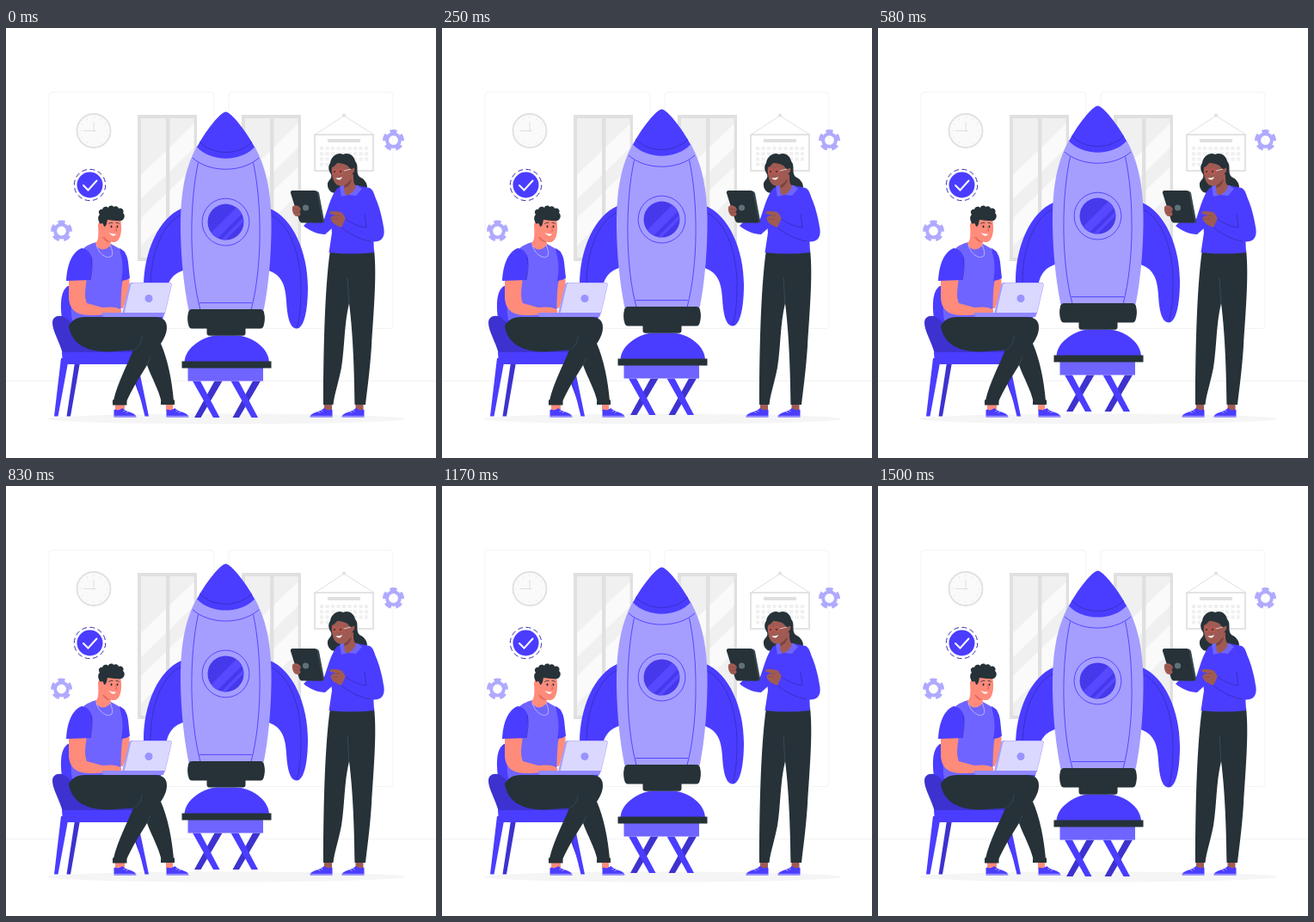
An HTML page for the animation above (1540 ms loop, 500x500 px).

```html
<!DOCTYPE html>
<html lang="en">
<head>
<meta charset="utf-8">
<title>Rocket workshop</title>
<style>
  html, body { margin: 0; width: 100%; height: 100%; overflow: hidden; background: #fff; }
  svg { display: block; width: 100%; height: 100%; }
  .main { fill: #4a3dff; }
  .deep { fill: #3d32cf; }
  .mid { fill: #6f64ff; }
  .pale { fill: #a59eff; }
  .dark { fill: #263238; }
  .skin { fill: #ff8b7b; }
  .brown { fill: #9f5b53; }
  .white { fill: #fff; }
  .line { fill: none; stroke: #4a3dff; stroke-width: .9; }
  .seam { fill: none; stroke: #2f26a8; stroke-width: .6; }
  .ink { fill: none; stroke: #263238; stroke-width: .8; stroke-linecap: round; }
  .grey { fill: none; stroke: #e0e0e0; }
</style>
</head>
<body>
<svg viewBox="0 0 500 500">
  <defs>
    <clipPath id="glass"><path d="M4 4H33V166H4ZM37.500 4H65.500V166H37.500Z"/></clipPath>
    <clipPath id="port"><circle cx="255.500" cy="226" r="21"/></clipPath>
    <g id="window">
      <path fill="#e0e0e0" d="M0 0H69V170H0Z"/>
      <g clip-path="url(#glass)">
        <path fill="#f0f0f0" d="M0 0H69V170H0Z"/>
        <path fill="#fafafa" d="M4 70L66 10V38L4 98ZM4 120L66 60V92L4 152Z"/>
      </g>
    </g>
    <g id="gear" fill="none" stroke="#b0aaff">
      <circle r="7.400" stroke-width="4"/>
      <circle r="10.400" stroke-width="4" pathLength="50" stroke-dasharray="6 4" transform="rotate(-111.600)"/>
    </g>
    <g id="fin">
      <path class="main" d="M306 210C334 221 351 262 351 302C351 331 346 350 338 350C330 350 327 336 326 318C325 299 320 286 303 282Z"/>
      <path class="seam" d="M308 218C330 229 343 264 343 302C343 325 341 340 338 349"/>
    </g>
    <g id="trestle">
      <path class="deep" d="M242.500 411H251.500L226.500 453.500H219Z"/>
      <path class="main" d="M217 411H226L248.500 453.500H241Z"/>
    </g>
    <g id="shoe">
      <path class="main" d="M0 0C3 -1 4 1 6 0L10 -2C14 3 26 3 26 8.500H0Z"/>
      <path d="M0 7.300H26M11 2l3-1.500M14 3.500l3-1.500" fill="none" stroke="#fff" stroke-width=".5"/>
    </g>
  </defs>

  <!-- room -->
  <g fill="none" stroke="#f3f3f3">
    <rect x="50" y="74.500" width="192" height="275" rx="4"/>
    <rect x="259" y="74.500" width="191" height="275" rx="4"/>
    <path d="M0 410.500H500"/>
  </g>
  <ellipse cx="256" cy="454.500" rx="208" ry="6" fill="#f5f5f5"/>
  <use href="#window" x="153" y="101"/>
  <use href="#window" x="274" y="101"/>

  <g class="grey">
    <circle cx="102" cy="119.500" r="19.500" stroke-width="1.800" fill="#fafafa"/>
    <circle cx="102" cy="119.500" r="15.500" stroke-width="2" pathLength="120" stroke-dasharray=".8 9.200" stroke-dashoffset=".4"/>
    <path d="M102 109V121M90 119.500H105"/>
    <path d="M360 123.500L393 102L427 123.500"/>
    <rect x="359" y="124" width="68" height="42" stroke-width="1.800" fill="#fff"/>
    <path d="M374 131H412" stroke-width="4"/>
    <path d="M365 140H422M365 146.200H422M365 152.400H422M365 158.600H409" stroke="#f0f0f0" stroke-width="4" stroke-dasharray="4.200 2.300"/>
    <circle cx="393" cy="101.500" r="2" fill="#e0e0e0" stroke="none"/>
  </g>

  <use href="#gear" x="64.500" y="236"/>
  <use href="#gear" x="450.500" y="130.500"/>
  <circle class="main" cx="97.500" cy="182.500" r="15"/>
  <circle cx="97.500" cy="182.500" r="18.200" fill="none" stroke="#3a30a8" pathLength="96" stroke-dasharray="5 3"/>
  <path d="M90 183L95.500 188.500L105.500 177.500" fill="none" stroke="#fff" stroke-width="2" stroke-linecap="round"/>

  <!-- chair -->
  <path class="deep" d="M80 389H86L75 451.500H70.500ZM141 389H147L160 430L158 435Z"/>
  <path class="main" d="M64 384H73L60.500 451.500H56ZM146 389H153L166 451.500H161.500Z"/>
  <path class="main" d="M72 300C63 306 63 322 65 338L72 356H90V300Z"/>
  <path class="deep" d="M54 343C54 336 60 333 68 336L80 346L150 372V379H66C62 364 54 352 54 343Z"/>
  <path class="main" d="M65 377H150V391H66Z"/>

  <!-- rocket -->
  <g id="rocket">
    <use href="#trestle"/>
    <use href="#trestle" x="44.500"/>
    <path class="mid" d="M211.500 395H299V411H211.500Z"/>
    <path class="main" d="M207.500 389C208 371 232 358 246 358H266C284 358 305 371 306 389Z"/>
    <path class="dark" d="M204.500 388H308.500V396H204.500Z"/>
    <rect class="dark" x="233.500" y="347" width="45" height="11.200" rx="3"/>
    <use href="#fin"/>
    <use href="#fin" transform="matrix(-1 0 0 1 511 0)"/>
    <path class="pale" d="M222 138C206 167 202.500 200 203 237C203.500 270 207 302 212.500 329H299.500C305 302 308 270 308.500 237C309 200 305 167 289 138Z"/>
    <path class="main" d="M255.500 98C261.500 98 279 120 289 139C273 156.500 238 156.500 222 139C232 120 249.500 98 255.500 98Z"/>
    <path class="seam" d="M225 132.500C240 149 271 149 286 132.500"/>
    <path class="line" d="M217 151.500C237 169 274 169 294 151.500M223.500 157C213 205 213 280 226 328M287.500 157C298 205 298 280 285 328M225 320H286"/>
    <circle class="line" cx="255.500" cy="226" r="27.400"/>
    <circle cx="255.500" cy="226" r="21" fill="#4639ec"/>
    <path d="M233 244L274 203H288L233 258ZM241 256L280 217V222L246 256Z" fill="#5649ff" clip-path="url(#port)"/>
    <path class="dark" d="M216 327.500H296Q299 327.500 300 331Q302 339 299.500 347Q298.500 350 296 350H216Q213.500 350 212.500 347Q210 339 212 331Q213 327.500 216 327.500Z"/>
  </g>

  <!-- seated man -->
  <path class="skin" d="M127 436H138V445H127ZM186 436H194V445H186Z"/>
  <use href="#shoe" x="125.500" y="444"/>
  <use href="#shoe" x="186.500" y="444"/>
  <path class="skin" d="M133 292H143.500C144 304 140 316 136 326H126Z"/>
  <path class="mid" d="M97 252C104 248 114 248 122 251L138 260C141 270 139 285 135 297C133 315 134 325 133 340H77C74 325 77 305 79 290C80 270 86 256 97 252Z"/>
  <path class="main" d="M132 256C138 259 141 264 142 272L144 291Q139 294 134 294C136 285 136 274 134 266Z"/>
  <path class="dark" d="M73 346C75 363 88 376 118 376.500L148 374.500C140 394 130 412 125 433L139 437C146 420 156 405 164 392C169 406 178 421 181 436L195 434C193 410 188 385 180 367C186 358 188 351 186.500 344C185 338 179 335.500 170 336L92 336C82 336 77 340 73 346Z"/>
  <path d="M124 432.500L140.500 433.500V438.500H124ZM180 433.500L196 432.500V438H180Z" class="dark"/>
  <path d="M150 374C156 369 158 363 158 358M164 392L168 383" fill="none" stroke="#455a64" stroke-width=".5"/>
  <path class="skin" d="M107 228C108 243 107 248 104 250C106 258 115 261 122 252L121 242Z"/>
  <path d="M112 243C115 248 118 249 121.500 249L120 244Z" fill="#e0695d"/>
  <path class="skin" d="M112 222C118 217 129 217 133 222C135 231 135 248 126 249C118 250 112 242 111 235C106 234 106 225 110 225Z"/>
  <path class="dark" d="M110 228C107 225 106 219 109 217C106 213 110 210 112 211C113 207 117 207 119 209C120 206 124 206 125 208C128 206 131 208 131 210C135 208 138 213 136 215C139 217 138 223 134 224C129 225 122 223 118 223C117 227 117 231 114 231C113 227 112 226 110 228Z"/>
  <ellipse class="dark" cx="122.500" cy="231" rx="1" ry="1.400"/>
  <ellipse class="dark" cx="129.500" cy="231" rx=".9" ry="1.400"/>
  <path class="ink" d="M119.500 227.500Q122 225.500 124 226.500M128 226.500Q130 226 131.500 227.500"/>
  <path d="M127 231L129 236L126 236" fill="none" stroke="#d85d55" stroke-width=".7"/>
  <path class="white" d="M119.500 238Q124 240 128 239.500Q125 244.500 119.500 238Z"/>
  <path d="M105 252C107 262 118 270 123 265Q125 261 121 252" fill="none" stroke="#c9c5ff" stroke-width=".8"/>
  <path class="skin" d="M73 291H94C92 304 91 313 94 320L112 325C120 324 128 324 133 327C136 329 134 332 130 332L104 334C83 335 74 329 73 314Z"/>
  <path class="main" d="M70 294C71 276 76 261 88 256C96 257 101 264 100 274C99 281 99 287 98 293Z"/>
  <path class="seam" d="M98 293C100 284 101 272 99 266"/>

  <!-- laptop -->
  <path class="pale" d="M146 296H190Q193.500 296 192.500 300L185 332H135L143 299Q143.500 296 146 296Z"/>
  <path d="M148 296.500H190Q193 296.500 192 300L184.500 332H137.500L145 299.500Q145.500 296.500 148 296.500Z" fill="#dbd8ff"/>
  <circle cx="166" cy="314.500" r="4.500" fill="#9a92ff"/>
  <path d="M112 331H185L183 336H114Q111 334 112 331Z" fill="#9188ff"/>

  <!-- standing woman -->
  <path class="brown" d="M370 435H379V445H370ZM406.500 435H415.500V445H406.500Z"/>
  <use href="#shoe" transform="matrix(-1 0 0 1 379.500 444)"/>
  <use href="#shoe" transform="matrix(-1 0 0 1 416.500 444)"/>
  <path class="dark" d="M377 258H428C431.500 288 427 335 425 370C423 400 420 420 418 438H405.500C405 405 404 360 399 320C393 345 394 370 390 395C386 415 382 425 380.500 438H369C369 390 370 305 377 258Z"/>
  <path d="M397 290L399 322" stroke="#455a64" stroke-width=".6"/>
  <path class="dark" d="M377 157C378 149 386 144 392 147C399 144 405 149 406 155C411 160 406 168 411 173C416 175 420 180 420 185C417 190 406 188 400 187L386 190C380 195 374 188 374 183C373 177 380 176 378 170C375 166 374 161 377 157Z"/>
  <path class="main" d="M387 185C379 191 375 208 370 222L350 226L346 230C353 236 363 240 371 240L380 232Z"/>
  <path class="main" d="M386 186L408 183L423 186C430 190 431 205 432 222L427 240L428 261Q402 264 375.500 261L379 238C377 220 379 200 386 186Z"/>
  <path class="mid" d="M388 184L394 181L409 183L414 187L407 195L398 194L390 196Z"/>
  <path class="brown" d="M394 176L404 170C404 177 404 181 407 184C405 190 400 195 395 194C393 190 393 187 393 183Z"/>
  <path d="M394 180L402 176C400 183 397 185 393 186Z" fill="#7d433f"/>
  <path class="brown" d="M379 160C383 155 394 154 400 159C406 159 407 166 403 169C402 176 397 184 388 183.500C380 182 378 170 379 160Z"/>
  <path class="dark" d="M377 163C380 162 383 160 385 157C392 157 398 159 400 164C404 164 408 162 406 155C402 147 385 146 379 154Z"/>
  <g fill="none" stroke="#d9534f" stroke-width=".8">
    <circle cx="382" cy="167" r="2.800"/>
    <circle cx="389.500" cy="166.500" r="3.200"/>
    <path d="M393 166L401 164" stroke="#e6e6e6"/>
  </g>
  <circle class="dark" cx="382" cy="167" r=".9"/>
  <circle class="dark" cx="389" cy="167" r=".9"/>
  <path class="white" d="M383 174.500Q388 175 391 173Q389 179 383 174.500Z"/>

  <!-- tablet and hands -->
  <path d="M334 189.500L361 189.500Q363.500 190 364 192L370 224Q370.500 226.500 368 226.500H343Z" fill="#37474f"/>
  <path class="dark" d="M333 189H358.500Q361 189 361.500 191L368 224Q368.500 226.500 366 226.500L344 226Q341.500 226 341 224L331 192Q330.500 189 333 189Z"/>
  <circle cx="348.500" cy="209" r="3.600" fill="#607078"/>
  <path class="brown" d="M333 208C335 205 340 206 342 209C344 212 342 213 341 213C344 216 342 219 339 219C335 220 332 213 333 208Z"/>
  <path d="M335 210.500L341 211M335 214L341 214.500" stroke="#7d433f" stroke-width=".6"/>
  <path class="brown" d="M376 214C380 212 388 213 391 215L397 225L391 232C384 230 379 227 378 223C376 221 379 218 384 218L377 216Z"/>
  <path d="M384 218L388 218M379 222L386 222" stroke="#7d433f" stroke-width=".6"/>
  <path class="main" d="M421 186C430 191 437 216 439.500 234C441 247 433 250 422 248C411 246 399 239 390 232L395 221C403 227 411 231 419 232Z"/>
  <path class="seam" d="M390 232C399 239 411 246 424 248M395 222C403 228 411 231 419 232L417 216"/>
</svg>
<script>
  const rocket = document.getElementById('rocket');
  const period = 1540, peak = 715, rise = 9.3;

  // steady climb to the peak, then steady descent
  function draw(now) {
    const distance = Math.abs(now % period - peak) / (period / 2);
    const y = 0.3 - rise * (1 - distance);
    rocket.setAttribute('transform', `translate(0 ${y.toFixed(3)})`);
    requestAnimationFrame(draw);
  }
  draw(performance.now());
</script>
</body>
</html>
```
